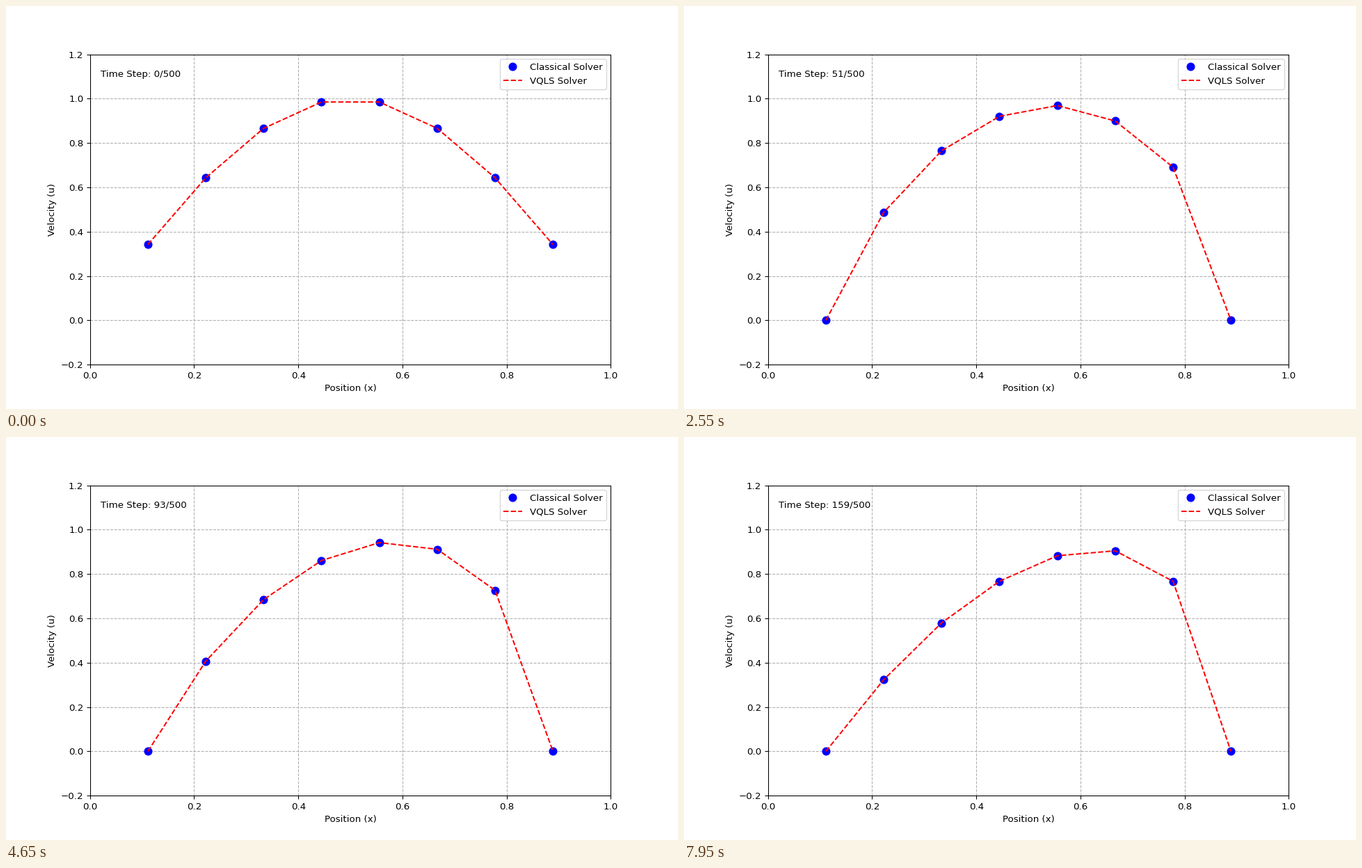
Animation of 966x580 px, one loop 8 s. Source, as a matplotlib script:

```python
import numpy as np
import matplotlib.pyplot as plt
from matplotlib.animation import FuncAnimation

POINTS = 8
FRAMES = 160
DX = 1 / (POINTS + 1)
DT = 0.001
NU = 0.01


def step(u):
    """Advance Burgers' equation: upwind advection, central diffusion."""
    new = np.zeros_like(u)
    mid, left, right = u[1:-1], u[:-2], u[2:]
    new[1:-1] = (mid - DT / DX * mid * (mid - left)
                 + NU * DT / DX**2 * (right - 2 * mid + left))
    return new


x = np.arange(1, POINTS + 1) * DX
history = [np.sin(np.pi * x)]
for _ in range(FRAMES - 1):
    history.append(step(history[-1]))

# 966 x 580 pixels
fig, ax = plt.subplots(figsize=(10, 6.005), dpi=96.6)
ax.set_xlim(0, 1)
ax.set_ylim(-0.2, 1.2)
ax.set_xlabel("Position (x)")
ax.set_ylabel("Velocity (u)")
ax.grid(True, linestyle="--")

dots, = ax.plot(x, history[0], "bo", markersize=8, label="Classical Solver")
line, = ax.plot(x, history[0], "r--", label="VQLS Solver")
label = ax.text(0.02, 1.1, "")
ax.legend(loc="upper right")


def update(i):
    dots.set_ydata(history[i])
    line.set_ydata(history[i])
    label.set_text(f"Time Step: {i}/500")
    return dots, line, label


anim = FuncAnimation(fig, update, frames=FRAMES, interval=50,
                     repeat=True, repeat_delay=0)
plt.show()
```
